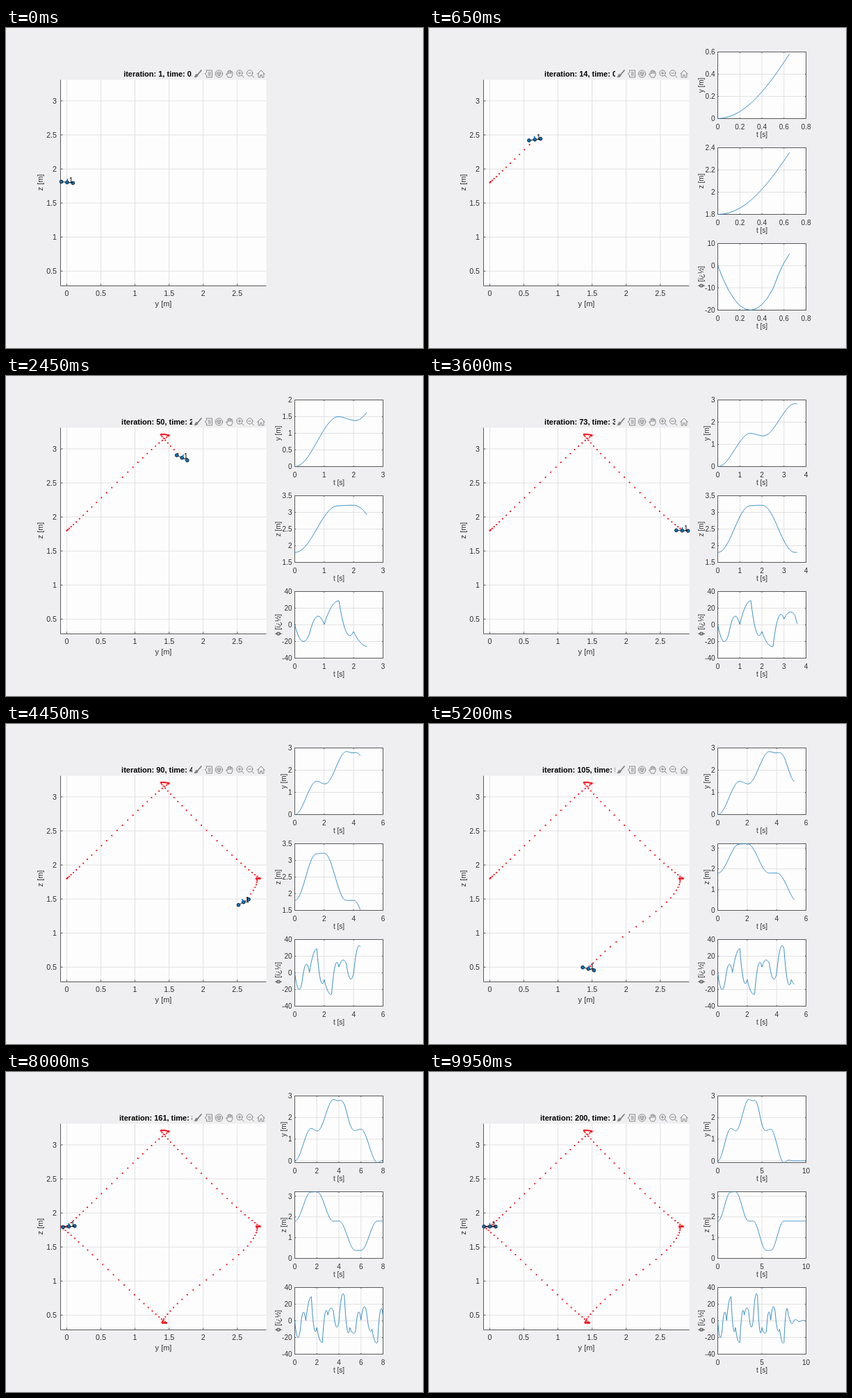
An HTML page that plays this animation: 600x461 px, repeating every 10000 ms.

```html
<!DOCTYPE html>
<html lang="en">
<head>
<meta charset="utf-8">
<title>Planar flight plot</title>
<style>
  html, body { margin: 0; width: 100%; height: 100%; overflow: hidden; background: #efeef0; }
  svg { display: block; width: 600px; height: 461px; font-family: "Liberation Sans", Arial, sans-serif; fill: #303030; }
  .grid { stroke: #e2e1e2; stroke-width: 1; fill: none; }
  .axis { stroke: #5a5a5a; stroke-width: 1; fill: none; }
  .curve { stroke: #2686bf; stroke-width: .9; fill: none; stroke-linejoin: round; }
  .main { font-size: 10.7px; }
  .small { font-size: 10px; }
  .icon { stroke: #7f7f7f; stroke-width: .9; fill: none; stroke-linecap: round; stroke-linejoin: round; }
  .mid { text-anchor: middle; }
  .end { text-anchor: end; }
</style>
</head>
<body>
<svg viewBox="0 0 600 461">
  <rect width="600" height="461" fill="#efeef0"/>
  <g id="main" class="main"></g>
  <text id="title" class="mid" x="225.7" y="69.5" font-size="11" font-weight="bold" fill="#000"></text>
  <rect x="268" y="57" width="107" height="17" fill="#efeef0"/>
  <g class="icon">
    <path d="M281 61l-5.5 6.500" stroke-width="1.800"/>
    <path d="M275.500 67.500l-1.500-1c-1.500.5-1.500 3-3 4c2 .8 4.500 0 5-2z" fill="#7f7f7f"/>
    <path d="M288.500 61h8v10h-8v-3l-2.500-2l2.500-2zM291 64h3.500M291 66h3.500M291 68h3.500"/>
    <circle cx="306.500" cy="66" r="5.200"/>
    <path d="M304 64.500l2.500-1.300l2.500 1.300v3l-2.500 1.300l-2.500-1.300zM304 64.500l2.500 1.300l2.500-1.300M306.500 66v2.600"/>
    <path d="M319.500 70.800l-3-4.600q.8-1.200 2.300.6v-4.300q1-1.300 1.700 0v-1.200q1-1 1.800 0v.6q1-1 1.800 0v1.200q1.200-1 1.800.3v4.400l-1.400 3z"/>
    <path d="M320.500 62.500v3M322.300 61.500v4M324.100 62.500v3"/>
    <circle cx="336" cy="65" r="4.200"/><path d="M339.200 68.200l3 3M334 65h4M336 63v4"/>
    <circle cx="350.700" cy="65" r="4.200"/><path d="M353.900 68.200l3 3M348.700 65h4"/>
    <path d="M361.500 66.500l5.500-5.500l5.500 5.500M363.200 65.200v6h2.600v-3.500h2.400v3.500h2.600v-6"/>
  </g>
  <g id="trail" fill="#f5101a"></g>
  <g id="craft"></g>
  <g id="plots" class="small"></g>
</svg>
<script>
const DT = 0.05, COUNT = 200, SIDE = Math.SQRT2;
const el = id => document.getElementById(id);

// tracking error of y in cm, roll and its mid-arc bulge in degrees, every half second
const sway = [0, 2, 4.5, 8.4, -3, -7, -6, .7, -4.8, 11, -7, -1.4, 4.6, -.5, -4, -8.3, 2.8];
const roll = [0, -10.5, .5, 29, -8, -26, 7, 11.5, -1, 29, -8, -13, 1, 11, -10, -26, 6];
const bulge = [-14.4, 15, 7, -19, -5, 18.5, 6, -12, 15, -21, -4, 16, 10.5, -10.5, -6, 22];

function ease(x) {
  const u = Math.min(1, Math.max(0, x));
  return .7 * u * u * (3 - 2 * u) + .3 * u ** 3 * (10 - 15 * u + 6 * u * u);
}

// share of each two-second side of the diamond already flown
const leg = (k, t) => ease((t - 2 * k) / 1.5);

function lateral(t) {
  const i = Math.floor(t * 2), u = t * 2 - i;
  const [a, b, c, d] = [-1, 0, 1, 2].map(j => sway[i + j] || 0);
  const error = b + u * (c - a + u * (2 * a - 5 * b + 4 * c - d + u * (3 * (b - c) + d - a))) / 2;
  return SIDE * (leg(0, t) + leg(1, t) - leg(2, t) - leg(3, t)) + error / 100;
}

const height = t => 1.8 + SIDE * (leg(0, t) - leg(1, t) - leg(2, t) + leg(3, t))
  - .015 * Math.exp(-(((t - 1.5) / .2) ** 2));

// parabolic arcs, then a damped swing once home
function tilt(t) {
  if (t >= 8) return 6 * Math.exp(1.5 * (8 - t)) * Math.cos(7.5 * (t - 8));
  const i = Math.floor(t * 2), u = t * 2 - i;
  return roll[i] + u * (roll[i + 1] - roll[i]) + 4 * bulge[i] * u * (1 - u);
}

const states = Array.from({ length: COUNT + 1 }, (_, k) => {
  const t = k / 20;
  return { t, y: lateral(t), z: height(t), roll: tilt(t) };
});

const px = y => 87.5 + 98.1 * y;
const pz = z => 105 + 98.1 * (3 - z);
const n = v => v.toFixed(2);
const line = (cls, d) => `<path class="${cls}" d="${d}"/>`;
const label = (cls, x, y, s, more = '') => `<text class="${cls}" x="${n(x)}" y="${n(y)}" ${more}>${s}</text>`;
const upright = (x, y, s) => label('mid', 0, 0, s, `transform="translate(${n(x)} ${n(y)}) rotate(-90)"`);

function drawMain() {
  let grid = '', ticks = 'M78.500 74.500V371.500H374.500', text = '';
  for (let v = 0; v <= 2.5; v += .5) {
    const x = px(v), y = pz(v + .5);
    grid += `M${n(x)} 74.500V371M79 ${n(y)}H374.500`;
    ticks += `M${n(x)} 371.500v-3M78.500 ${n(y)}h3`;
    text += label('mid', x, 386, v) + label('end', 73, y + 4, v + .5);
  }
  el('main').innerHTML = '<rect x="78" y="74.500" width="296.500" height="297" fill="#fefdfe"/>'
    + line('grid', grid) + line('axis', ticks) + text
    + label('mid', 226.5, 400.7, 'y [m]', 'font-size="11"')
    + `<g font-size="11">${upright(53, 222.5, 'z [m]')}</g>`;
}

// round limits with at most four intervals
function limits(lo, hi, snug) {
  const base = 10 ** (Math.floor(Math.log10(hi - lo)) - 1);
  for (const m of [1, 2, 5, 10, 20, 50, 100]) {
    const step = m * base;
    const a = Math.floor(lo / step + 1e-6), b = Math.ceil(hi / step - 1e-6);
    if (b - a > 4) continue;
    const r = { step, lo: a * step, hi: b * step };
    if (snug && b - a > 1) {
      if (hi - (b - 1) * step < .25 * step) r.hi = hi;
      if ((a + 1) * step - lo < .25 * step) r.lo = lo;
    }
    return r;
  }
}

function tickValues(r) {
  const out = [];
  for (let i = Math.ceil(r.lo / r.step - 1e-6); i * r.step <= r.hi + r.step * 1e-6; i++) out.push(i * r.step);
  return out;
}

function subplot(data, key, name, top) {
  const left = 415.5, right = 542.5, bottom = top + 96;
  const values = data.map(s => s[key]);
  const rx = limits(0, data[data.length - 1].t);
  const ry = limits(Math.min(...values), Math.max(...values), true);
  const X = v => left + (right - left) * (v - rx.lo) / (rx.hi - rx.lo);
  const Y = v => bottom - (bottom - top) * (v - ry.lo) / (ry.hi - ry.lo);
  const big = Math.max(Math.abs(ry.lo), Math.abs(ry.hi));
  const power = big <= .01 ? Math.floor(Math.log10(big) - 1e-6) : 0;
  const show = (v, step) => String(+v.toFixed(Math.max(0, -Math.floor(Math.log10(step) + 1e-6))));
  let grid = '', ticks = `M${left} ${top}H${right}V${bottom}H${left}Z`, text = '', wide = 0;
  for (const v of tickValues(rx)) {
    const x = n(X(v));
    grid += `M${x} ${top}V${bottom}`;
    ticks += `M${x} ${bottom}v-1.500M${x} ${top}v1.500`;
    text += label('mid', X(v), bottom + 15, show(v, rx.step));
  }
  for (const v of tickValues(ry)) {
    const y = n(Y(v)), s = show(v / 10 ** power, ry.step / 10 ** power);
    grid += `M${left} ${y}H${right}`;
    ticks += `M${left} ${y}h1.500M${right} ${y}h-1.500`;
    text += label('end', left - 4, Y(v) + 3.6, s);
    wide = Math.max(wide, [...s].reduce((w, c) => w + (c === '.' ? 2.8 : c === '-' ? 3.3 : 5.6), 0));
  }
  if (power) text += label('', left, top - 3, `×10<tspan dy="-4" font-size="7.500">${power}</tspan>`);
  const path = 'M' + data.map(s => n(X(s.t)) + ' ' + n(Y(s[key]))).join('L');
  return `<rect x="${left}" y="${top}" width="${right - left}" height="${bottom - top}" fill="#fefdfe"/>`
    + line('grid', grid) + line('axis', ticks) + line('curve', path) + text
    + label('mid', 479, bottom + 26.5, 't [s]')
    + upright(left - 6.5 - wide, top + 48, name);
}

function craft(s) {
  const x = px(s.y), y = pz(s.z), a = s.roll * Math.PI / 180;
  const dx = 8.4 * Math.cos(a), dy = 8.4 * Math.sin(a);
  const rotor = k => `<circle cx="${n(x + k * dx)}" cy="${n(y - k * dy)}" r="2.400" fill="#0072bd" stroke="#111" stroke-width=".8"/>`;
  return `<path d="M${n(x - dx)} ${n(y + dy)}L${n(x + dx)} ${n(y - dy)}" stroke="#111" stroke-width=".9"/>`
    + rotor(-1) + rotor(1) + rotor(0)
    + `<path d="M${n(x)} ${n(y)}l${n(-5 * Math.sin(a))} ${n(-5 * Math.cos(a))}" stroke="#0072bd" stroke-width="1.600"/>`
    + label('mid', x + 5.5, y + .6, '1', 'font-size="10" fill="#000"');
}

let shown = -1;
function draw(ms) {
  const k = Math.floor(ms / 50) % COUNT;
  if (k === shown) return;
  shown = k;
  const data = states.slice(0, k + 1);
  el('title').textContent = `iteration: ${k + 1}, time: ${((k + 1) * DT).toFixed(2)}`;
  el('trail').innerHTML = data.map(s => `<circle cx="${n(px(s.y))}" cy="${n(pz(s.z))}" r="1.100"/>`).join('');
  el('craft').innerHTML = craft(states[k + 1]);
  el('plots').innerHTML = k < 1 ? '' : subplot(data, 'y', 'y [m]', 34.5)
    + subplot(data, 'z', 'z [m]', 172.5) + subplot(data, 'roll', 'ϕ [ï¿½]', 310.5);
}

drawMain();
const start = performance.now();
function tick() {
  draw(performance.now() - start);
  requestAnimationFrame(tick);
}
tick();
</script>
</body>
</html>
```
